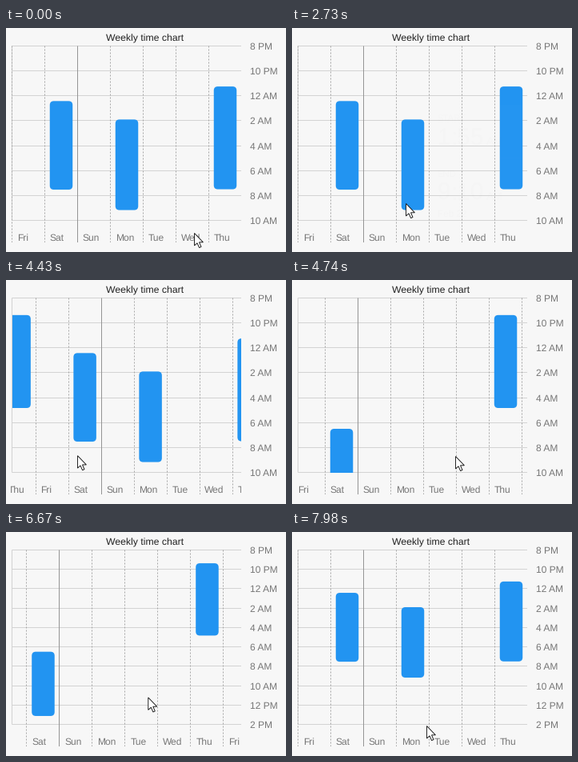
A matplotlib script for the animation above (8 s loop, 350x280 px).

```python
import numpy as np
import matplotlib.pyplot as plt
from matplotlib.animation import FuncAnimation
from matplotlib.collections import LineCollection
from matplotlib.patches import FancyBboxPatch, Polygon, Rectangle

W, H, DPI = 350, 280, 100
LOOP, STEP = 8000, 40
PX = 72 / DPI
LEFT, RIGHT, TOP, BOTTOM, FOOT = 7.5, 294, 22.5, 240.5, 268
COL, BAR = 41, 28.5
WEEK = 7 * COL
DAYS = ["Fri", "Sat", "Sun", "Mon", "Tue", "Wed", "Thu"]
BLUE, GRAY = "#2294f1", "#777777"

# column, start and end in hours after 8 PM
SLEEP = [(-6, 10.5, 17.13), (-1, 1.37, 8.83),
         (1, 4.42, 11.53), (3, 5.9, 13.17), (6, 3.25, 11.5)]

# eased pointer moves: start, end, x, y reached
HOME = (235, 256)
MOVES = [(70, 810, 270, 152), (890, 1480, 168, 224), (1730, 1810, 175, 226),
         (1960, 2350, 142, 219), (3050, 3280, 103, 210),
         (3510, 3800, 89, 219), (3840, 4310, 70, 219), (4310, 4690, 204, 220),
         (4800, 5350, 165, 203), (5900, 6400, 199, 203),
         (6514, 6890, 116, 216), (7590, 7950, 168, 242)]

ARROW = np.array([(0.5, 0.5), (0.5, 16), (4, 12.8), (6.6, 18.6), (9, 17.5),
                  (6.5, 11.8), (11.4, 11.8)])

plt.rcParams["font.family"] = "Liberation Sans"
plt.rcParams["text.hinting"] = "none"
fig = plt.figure(figsize=(W / DPI, H / DPI), dpi=DPI, facecolor="#f7f7f7")
ax = fig.add_axes([0, 0, 1, 1])
ax.set_xlim(0, W)
ax.set_ylim(H, 0)
ax.axis("off")

plot_clip = Rectangle((LEFT, TOP), RIGHT - LEFT, BOTTOM - TOP,
                      transform=ax.transData)
day_clip = Rectangle((6, 242), RIGHT - 6, 36, transform=ax.transData)
live = []


def track(art, z, clip=None):
    art.set_zorder(z)
    if clip is not None:
        art.set_clip_path(clip)
    live.append(art)


def text(x, y, s, size=12, color=GRAY, z=3, alpha=1, clip=None):
    track(ax.text(x, y, s, fontsize=size * PX, color=color, alpha=alpha,
                  clip_on=clip is not None), z, clip)


def box(x, y, w, h, r, color, z, alpha=1, clip=None):
    style = f"round,pad=0,rounding_size={r}"
    patch = FancyBboxPatch((x, y), w, h, boxstyle=style, fc=color, lw=0,
                           alpha=alpha)
    track(ax.add_patch(patch), z, clip)


def poly(points, color, z, edge="none", lw=0, alpha=1):
    patch = Polygon(points, fc=color, ec=edge, lw=lw * PX, alpha=alpha,
                    joinstyle="miter")
    track(ax.add_patch(patch), z)


def lines(segs, color, dash="solid"):
    rules = LineCollection(segs, colors=color, linewidths=PX, linestyles=dash,
                           snap=False)
    track(ax.add_collection(rules, autolim=False), 1)


def crisp(v):
    return np.floor(v) + 0.5


def ramp(t, start, end):
    u = np.clip((t - start) / (end - start), 0, 1)
    return u * u * (3 - 2 * u)


def pointer(t):
    pos = np.array(HOME, float)
    for start, end, x, y in MOVES:
        pos += (np.array((x, y)) - pos) * ramp(t, start, end)
    return pos


def scroll(t):
    """Swipe one week back, later one week forward."""
    return WEEK * (ramp(t, 4310, 4762) - ramp(t, 6514, 7247))


def hour_y(h, span):
    return TOP + (BOTTOM - TOP) * h / span


def draw_grid(shift, span):
    rows = [[(LEFT, TOP), (LEFT, BOTTOM)]]
    for h in range(0, 19, 2):
        y = hour_y(h, span)
        if y > BOTTOM + 0.5:
            break
        rows.append([(LEFT, crisp(y)), (RIGHT, crisp(y))])
        clock = (20 + h) % 24
        text(305, y + 4.5, f"{clock % 12 or 12} {'PM' if clock >= 12 else 'AM'}")
    lines(rows, "#d3d3d3")

    dashed, solid = [], []
    for k in range(-8, 8):
        x = LEFT + COL * k + shift
        if LEFT - 0.5 <= x < RIGHT:
            seg = [(crisp(x), TOP), (crisp(x), FOOT)]
            (solid if k % 7 == 2 else dashed).append(seg)
        if -30 < x < RIGHT:
            text(x + 6.3, 266, DAYS[k % 7], clip=day_clip)
    lines(dashed, "#a8a8a8", (0, (2, 2)))
    lines(solid, "#959595")


def draw_bars(shift, span):
    for k, start, end in SLEEP:
        x = LEFT + COL * k + shift + (COL - BAR) / 2
        if x + BAR > LEFT and x < RIGHT:
            y = hour_y(start, span)
            box(x, y, BAR, hour_y(end, span) - y, 5, BLUE, 2, clip=plot_clip)


def draw_clock(x, y, clock, half, a):
    """Large evenly spaced digits followed by AM or PM."""
    size = 29.5
    for ch in clock:
        text(x, y, ch, size, GRAY, 6, a)
        x += size * (0.278 if ch == ":" else 0.556)
    text(x + 4, y, half, 14, GRAY, 6, a)


def draw_card(x, mid, side, start, end, date, a):
    """Tooltip with its pointer on the right (side 1) or left (side -1)."""
    w, h = 123, 150
    top = mid - h / 2
    base = x + w - 0.5 if side > 0 else x + 0.5
    tip = np.array([(base, mid - 7.5), (base + 7 * side, mid),
                    (base, mid + 7.5)])
    for s in (0.5, 1.2, 2, 3):
        box(x - s, top - s + 1.2, w + 2 * s, h + 2 * s, 5 + s, "black", 5,
            0.07 * a)
        poly(tip + (0, 1), "none", 5, "black", 2 * s, 0.05 * a)
    box(x, top, w, h, 5, "#fdfdfd", 5.1, a)
    poly(tip, "#fdfdfd", 5.2, alpha=a)

    left = x + 7
    for label, clock, y in (("START", start, mid - 54.7), ("END", end, mid + 14.7)):
        text(left, y, label, 11.2, "#606060", 6, a)
        draw_clock(left, y + 29.5, *clock, a)
    box(left, mid - 9, w - 14, 1, 0, "#e4e4e4", 6, a)
    text(left, mid + 65, date, 11.7, "#444444", 6, a)


def draw(i):
    while live:
        live.pop().remove()
    t = i * STEP
    shift = scroll(t)
    span = 14 + 4 * ramp(t, 5920, 6260)
    draw_grid(shift, span)
    draw_bars(shift, span)

    first = ramp(t, 880, 1030) - ramp(t, 1950, 2110)
    if first > 0:
        draw_card(128, 137, 1, ("11:15", "PM"), ("7:30", "AM"),
                  "Feb 24 - 25", first)
    second = ramp(t, 2710, 2880) - ramp(t, 3500, 3660)
    if second > 0:
        draw_card(174.5, 171, -1, ("1:55", "AM"), ("9:10", "AM"),
                  "Feb 22", second)

    poly(ARROW + pointer(t), "white", 9, "#111111", 0.9)
    return live


ax.text(174, 17, "Weekly time chart", fontsize=12.3 * PX, color="#222222",
        ha="center")

anim = FuncAnimation(fig, draw, frames=LOOP // STEP, interval=STEP,
                     init_func=lambda: [], repeat=True, repeat_delay=0,
                     blit=False)
plt.show()
```
